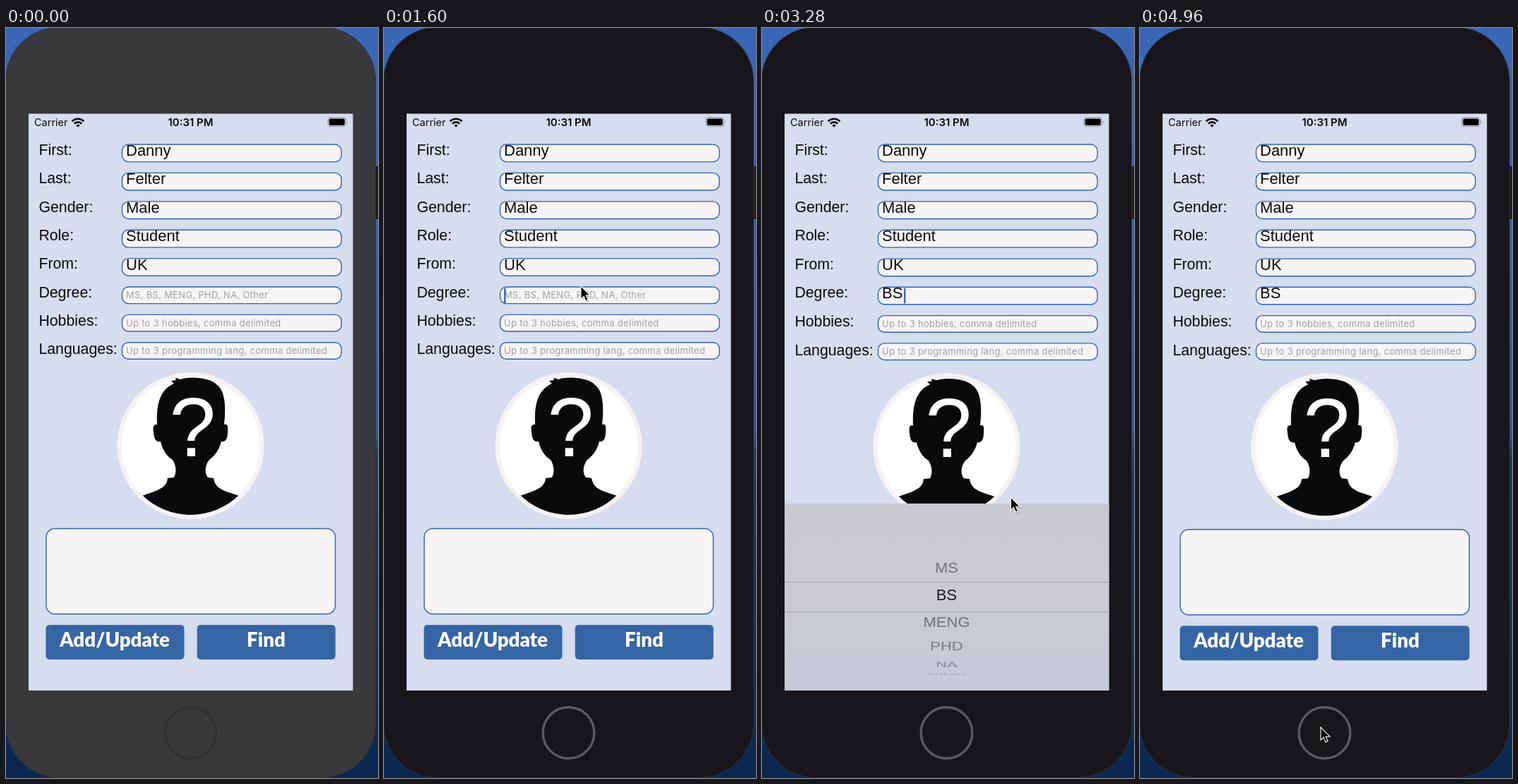
Write an HTML page that moves like this. It is 527 by 1063 pixels and loops after 5000 ms.

```html
<!DOCTYPE html>
<html lang="en">
<head>
<meta charset="utf-8">
<title>Profile form</title>
<style>
  html, body { margin: 0; width: 100%; height: 100%; overflow: hidden; background: #16366e; }
  svg { display: block; width: 527px; height: 1063px; }
  text { white-space: pre; }
  .label { font: 21.3px "Liberation Sans", Arial, sans-serif; fill: #0b0b0d; }
  .value, .wheel { font: 22px "Liberation Sans", Arial, sans-serif; fill: #0b0b0d; }
  .hint { font: 13px Inter, Roboto, sans-serif; letter-spacing: .3px; fill: #a2a0a4; }
  .status { font: 14.5px Inter, Roboto, sans-serif; fill: #0b0b0d; }
  .button { font: 900 27.7px Lato, "Open Sans", sans-serif; fill: #fff; text-anchor: middle; }
  .wheel { text-anchor: middle; }
  .box { fill: #f7f4f5; stroke: #3163ab; stroke-width: 1.4; }
</style>
</head>
<body>
<svg viewBox="0 0 527 1063">
  <defs>
    <linearGradient id="sky" x2="0" y2="1">
      <stop offset="0" stop-color="#3a66b6"/>
      <stop offset=".3" stop-color="#3263b4"/>
      <stop offset=".54" stop-color="#2a58a5"/>
      <stop offset=".57" stop-color="#173a72"/>
      <stop offset="1" stop-color="#0a2750"/>
    </linearGradient>
    <linearGradient id="sheet" x2="0" y2="1">
      <stop offset="0" stop-color="#c9cacf"/>
      <stop offset=".45" stop-color="#cacbd1"/>
      <stop offset="1" stop-color="#c5cad8"/>
    </linearGradient>
    <clipPath id="screen"><rect x="32" y="121.5" width="459.5" height="817.5"/></clipPath>
    <clipPath id="band"><rect x="32" y="111.5" width="460" height="42"/></clipPath>
    <clipPath id="offBand"><path d="M32 0H492V111.5H32ZM32 153.5H492V265H32Z"/></clipPath>
    <clipPath id="portrait"><circle cx="261.5" cy="592" r="98"/></clipPath>
  </defs>

  <rect width="527" height="1063" fill="url(#sky)"/>
  <g id="stars" fill="#a9c3ee"></g>
  <path d="M0 118h1.5v43H0ZM0 197h1.5v73H0ZM0 281h1.5v74H0ZM522 196h5v75h-5Z" fill="#1b1a1d"/>
  <rect id="body" x="-.5" y="-1" width="524" height="1063.5" rx="76" stroke="#2b3140" stroke-width="1"/>
  <circle id="home" cx="261.5" cy="999" r="36.3" fill="none" stroke-width="3.4"/>

  <g clip-path="url(#screen)">
    <rect x="32" y="121" width="460" height="819" fill="#d6ddee"/>
    <text class="status" x="40" y="139">Carrier</text>
    <g fill="none" stroke="#0b0b0d" stroke-width="2.7">
      <path d="M93.6 132.2a12 12 0 0 1 16.8 0M96.8 135.6a7.4 7.4 0 0 1 10.4 0"/>
      <path d="M102 140.8l-2.7-2.7a3.9 3.9 0 0 1 5.4 0Z" fill="#0b0b0d" stroke="none"/>
    </g>
    <text class="status" x="261.5" y="139" text-anchor="middle" style="font-size:15px;font-weight:600">10:31 PM</text>
    <rect x="456" y="127" width="25.5" height="12.6" rx="3.4" fill="none" stroke="#85888f"/>
    <rect x="457.6" y="128.6" width="22.3" height="9.4" rx="2" fill="#000"/>
    <path d="M483 131.2q2 2.1 0 4.2Z" fill="#85888f"/>

    <g id="rows"></g>

    <g id="lower">
      <circle cx="261.5" cy="592" r="104" fill="#f6f2f4"/>
      <circle cx="261.5" cy="592" r="98" fill="#fff"/>
      <path clip-path="url(#portrait)" fill="#090a0c" d="M214 562C208 561 208 567 209 573C210 584 213 587 219 586
        C222 599 228 607 236 612C241 620 242 629 238 637L229 638C228 648 222 652 210 657L190 664L200 700H325L333 664
        L312 657C300 652 296 648 294 638L286 637C280 630 283 618 288 612C296 606 302 598 305 586C311 587 314 582 314 573
        C315 564 314 561 309 562C312 535 310 514 299 506C291 496 262 493 247 498L239 495L241 499L234 500L238 504
        C217 513 213 535 214 562Z"/>
      <text x="264.3" y="607" text-anchor="middle" fill="#fff" style="font:118px 'Liberation Sans',Arial,sans-serif">?</text>
      <rect class="box" x="57" y="709.5" width="409.5" height="121" rx="12"/>
      <g fill="#3565a5">
        <rect x="56.5" y="846" width="196" height="49" rx="5"/>
        <rect x="270.7" y="846" width="196" height="49" rx="5"/>
      </g>
      <text class="button" x="154" y="877">Add/Update</text>
      <text class="button" x="368.5" y="877">Find</text>
    </g>

    <g id="picker">
      <rect x="32" width="460" height="266" fill="url(#sheet)"/>
      <path d="M32 111.5H492M32 153.5H492" stroke="#a6a8af"/>
      <g id="dim" clip-path="url(#offBand)"></g>
      <g id="bright" clip-path="url(#band)"></g>
    </g>
  </g>

  <g id="pointer">
    <path d="M1.5 2V20L5.5 16.3L8.5 23L12 21.5L9 15H14.5Z" fill="#000" opacity=".22"/>
    <path d="M0 0V18.2L4.1 14.4L7 21.2L10.2 19.8L7.3 13.2H13Z" fill="#000" stroke="#fff" stroke-width="1.1"/>
  </g>
</svg>

<script>
const LOOP = 5000, FOCUS_AT = 800, OPEN_AT = 1600, PICK_AT = 3200, CLOSE_AT = 3503;
const SHEET_TOP = 674, SHEET_HEIGHT = 265;
const WHEEL_CENTER = 129.5, WHEEL_RADIUS = 114, WHEEL_STEP = 0.345;
const OPTIONS = ['MS', 'BS', 'MENG', 'PHD', 'NA', 'Other'];

const $ = id => document.getElementById(id);
const clamp = u => Math.max(0, Math.min(1, u));

function add(parent, tag, attrs, text) {
  const node = document.createElementNS('http://www.w3.org/2000/svg', tag);
  set(node, attrs);
  if (text) node.textContent = text;
  return parent.appendChild(node);
}
function set(node, attrs) {
  for (const key in attrs) node.setAttribute(key, attrs[key]);
}
const move = (node, x, y) => set(node, { transform: `translate(${x} ${y})` });

// label, value, hint, field top, shift once the degree is filled in
const ROWS = [
  ['First:', 'Danny', '', 165, 0],
  ['Last:', 'Felter', '', 205.4, 0],
  ['Gender:', 'Male', '', 245.9, 0],
  ['Role:', 'Student', '', 286.3, 0],
  ['From:', 'UK', '', 326.6, 0.5],
  ['Degree:', 'BS', 'MS, BS, MENG, PHD, NA, Other', 367, 0.2],
  ['Hobbies:', '', 'Up to 3 hobbies, comma delimited', 406.4, 1.2],
  ['Languages:', '', 'Up to 3 programming lang, comma delimited', 445.7, 1.2]
].map(([label, value, hint, top, shift], i) => {
  const g = add($('rows'), 'g', {});
  const labelY = 180 + i * 40.35 - top;
  const row = { g, top, shift };
  add(g, 'text', { class: 'label', x: 46.4, y: labelY }, label);
  row.box = add(g, 'rect', { class: 'box', x: 164.5, width: 310.7, height: hint ? 23.6 : 24.6, rx: 9 });
  if (hint) row.hint = add(g, 'text', { class: 'hint', x: 170, y: 16.3 }, hint);
  if (value) row.value = add(g, 'text', { class: 'value', x: 170, y: 16, style: 'clip-path:inset(3px 0 0 0)' }, value);
  return row;
});
const degree = ROWS[5];
const caret = add(degree.g, 'rect', { y: 1.5, width: 2.5, height: 21.5, fill: '#3f66d0' });

const wheel = OPTIONS.map(name => [
  add($('dim'), 'text', { class: 'wheel' }, name),
  add($('bright'), 'text', { class: 'wheel' }, name)
]);

let seed = 7;
const random = () => (seed = seed * 16807 % 2147483647) / 2147483647;
for (let i = 0; i < 70; i++) {
  const x = random() * 60;
  add($('stars'), 'circle', {
    cx: i % 2 ? x : 527 - x, cy: random() * 60, r: 0.3 + random() * 0.5, opacity: 0.3 + random() * 0.5
  });
}

// time, x, y of the pointer tip
const PATH = [
  [560, 330, 1075], [800, 318, 925], [1040, 299, 819], [1360, 288, 520], [1540, 280, 380],
  [1660, 277, 382], [2080, 245, 683], [2480, 262, 792], [2600, 264, 791], [2920, 267, 764],
  [3080, 280, 752], [3400, 391, 618], [3560, 394, 612], [3960, 420, 701], [4400, 364, 850],
  [4800, 262, 984], [4960, 256, 991], [5000, 256, 991]
];

function pointerAt(t) {
  const i = Math.min(PATH.length - 2, Math.max(0, PATH.findIndex(p => p[0] > t) - 1));
  const a = PATH[i], b = PATH[i + 1], before = PATH[i - 1] || a, after = PATH[i + 2] || b;
  const span = b[0] - a[0], u = clamp((t - a[0]) / span);
  return [1, 2].map(k => {
    const m0 = (b[k] - before[k]) / (b[0] - before[0]) * span;
    const m1 = (after[k] - a[k]) / (after[0] - a[0]) * span;
    const d = b[k] - a[k];
    return a[k] + u * (m0 + u * (3 * d - 2 * m0 - m1 + u * (m0 + m1 - 2 * d)));
  });
}

// critically damped slide, settled after roughly 400 ms
function slide(ms) {
  const s = Math.max(0, ms) / 50;
  return 1 - (1 + s) * Math.exp(-s);
}

function wheelOffset(t) {
  const drag = clamp((t - 2520) / 400), settle = clamp((t - 2920) / 240);
  return 0.69 * drag * drag * (3 - 2 * drag) + 0.31 * (1 - (1 - settle) ** 3);
}

function drawWheel(offset) {
  wheel.forEach((copies, i) => {
    const angle = (i - offset) * WHEEL_STEP;
    const squash = Math.max(0.001, Math.cos(angle));
    const visible = Math.abs(angle) < 1.5;
    const y = WHEEL_CENTER + WHEEL_RADIUS * Math.sin(angle);
    copies.forEach((node, bright) => set(node, {
      transform: `translate(261.5 ${y}) scale(1 ${squash}) translate(0 7.9)`,
      opacity: visible ? (bright ? 0.92 : 0.48 * Math.sqrt(squash)) : 0
    }));
  });
}

function draw(t) {
  const active = t >= FOCUS_AT, filled = t >= PICK_AT;
  set($('body'), { fill: active ? '#18161a' : '#39383a' });
  set($('home'), { stroke: active ? '#5b5a5e' : '#313032' });

  ROWS.forEach(row => move(row.g, 0, row.top + (filled ? row.shift : 0)));
  set(degree.box, { height: filled ? 24.6 : 23.6 });
  set(degree.hint, { opacity: filled ? 0 : 1 });
  set(degree.value, { opacity: filled ? 1 : 0 });
  set(caret, { x: filled ? 201 : 170, opacity: t >= OPEN_AT && t < CLOSE_AT ? 1 : 0 });
  move($('lower'), 0, filled ? 1.3 : 0);

  const shown = slide(t - OPEN_AT) - slide(t - CLOSE_AT);
  move($('picker'), 0, SHEET_TOP + SHEET_HEIGHT * (1 - shown));
  drawWheel(wheelOffset(t));

  move($('pointer'), ...pointerAt(t));
  set($('pointer'), { opacity: t >= PATH[0][0] ? 1 : 0 });
}

const start = performance.now();
function tick() {
  draw((performance.now() - start) % LOOP);
  requestAnimationFrame(tick);
}
tick();
</script>
</body>
</html>
```
